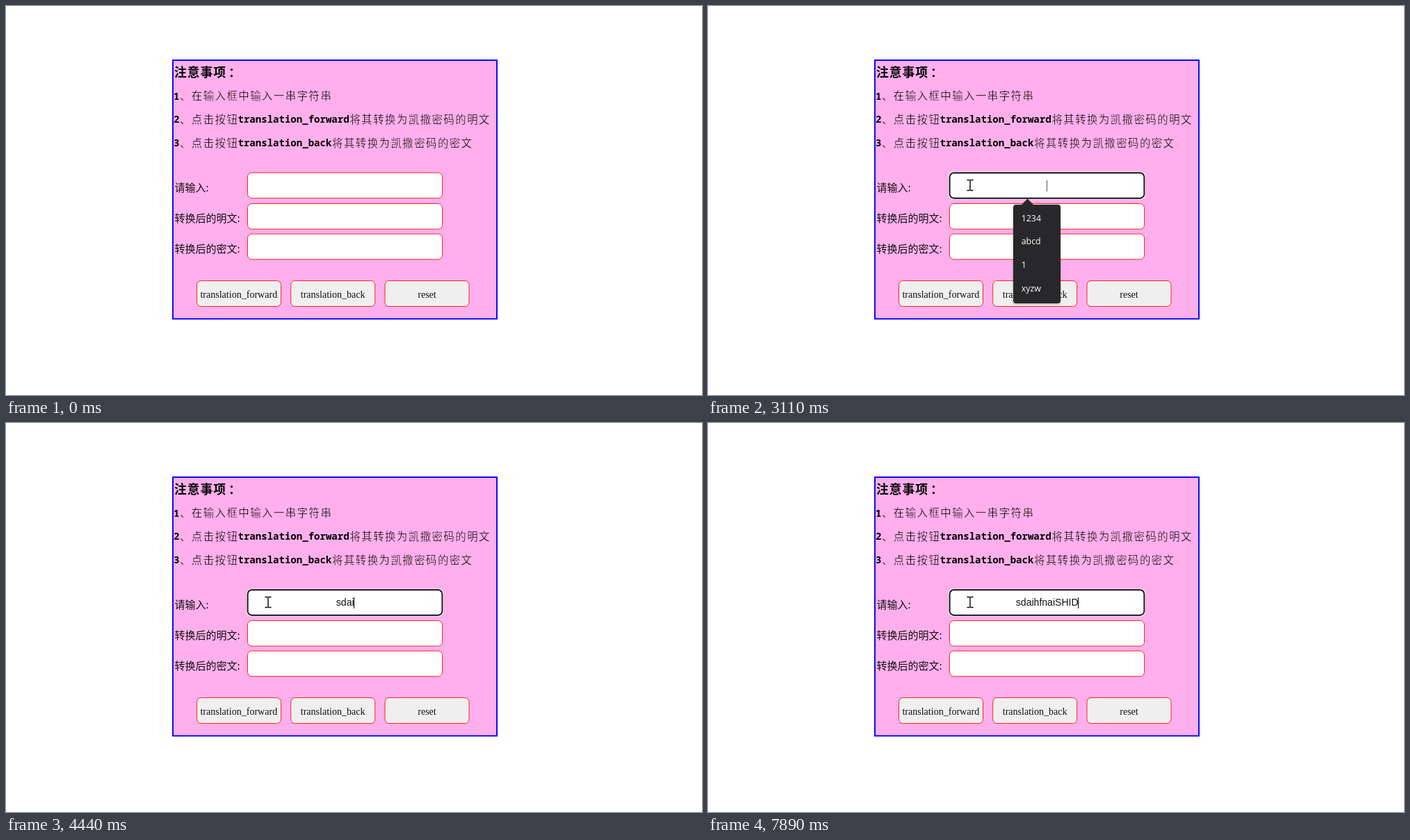
An HTML page that plays this animation: 1001x560 px, repeating every 8 s.

```html
<!DOCTYPE html>
<html lang="zh-CN">
<head>
<meta charset="utf-8">
<title>Cipher form</title>
<style>
  html, body { margin: 0; width: 100%; height: 100%; overflow: hidden; background: #fff; }
  svg { display: block; width: 100%; height: 100%; }
  text { fill: #000; white-space: pre; }
  .title { font: 700 17.8px "Noto Sans CJK SC", sans-serif; letter-spacing: .95px; }
  /* A thin stroke in the panel colour slims the brush-like lines */
  .note { font: 300 15.4px "Noto Sans CJK SC", sans-serif; letter-spacing: 1.475px; stroke: #ffb0ec; stroke-width: .35px; }
  .mono { font: 600 14.06px "Noto Sans Mono", monospace; letter-spacing: 0; stroke: none; }
  .label { font: 400 15px "Noto Sans CJK SC", sans-serif; }
  .label text { fill: #111; }
  .field { fill: #fff; stroke: #f22; }
  .button rect { fill: #efefef; stroke: #f22; }
  .button text { font: 14.06px "Liberation Serif", serif; text-anchor: middle; fill: #111; }
  #typed { font: 14.06px "Liberation Sans", sans-serif; text-anchor: middle; fill: #111; }
  #popup { transform-origin: 473px 357px; filter: drop-shadow(0 1px 1.5px rgba(0, 0, 0, .35)); }
  #popup path { fill: #28282b; }
  #popup text { font: 12.4px "Open Sans", sans-serif; fill: #fff; }
</style>
</head>
<body>
<svg viewBox="0 0 1001 560">
  <rect x="240" y="78" width="466" height="372.4" fill="#ffb0ec" stroke="#00f" stroke-width="1.9"/>

  <text class="title" x="242" y="102.3">注意事项<tspan dx="3">：</tspan></text>
  <g class="note">
    <text class="mono" x="241" y="134.5">1</text>
    <text x="250" y="134.8">、在输入框中输入一串字符串</text>
    <text class="mono" x="241" y="168.3">2</text>
    <text x="250" y="168.8">、点击按钮</text>
    <text class="mono" x="333.5" y="168.3">translation_forward</text>
    <text x="494.5" y="168.8">将其转换为凯撒密码的明文</text>
    <text class="mono" x="241" y="202">3</text>
    <text x="250" y="202.5">、点击按钮</text>
    <text class="mono" x="333.5" y="202">translation_back</text>
    <text x="469.1" y="202.5">将其转换为凯撒密码的密文</text>
  </g>

  <g class="label">
    <text x="242.5" y="266.7">请输入:</text>
    <text x="242.5" y="311">转换后的明文:</text>
    <text x="242.5" y="354.8">转换后的密文:</text>
  </g>

  <rect class="field" x="347.5" y="240" width="280" height="36.7" rx="6"/>
  <rect class="field" x="347.5" y="284.5" width="280" height="36.7" rx="6"/>
  <rect class="field" x="347.5" y="328.1" width="280" height="36.7" rx="6"/>

  <g class="button">
    <rect x="274.5" y="395.5" width="121" height="37" rx="6"/>
    <text x="334.8" y="419.5">translation_forward</text>
    <rect x="409.7" y="395.5" width="121" height="37" rx="6"/>
    <text x="470.2" y="419.5">translation_back</text>
    <rect x="545" y="395.5" width="121" height="37" rx="6"/>
    <text x="605.5" y="419.5">reset</text>
  </g>

  <g id="focus">
    <rect x="346" y="238.5" width="283" height="40" rx="7" fill="#fff"/>
    <rect x="347.6" y="240.2" width="279.8" height="36.5" rx="6" fill="#fff" stroke="#101010" stroke-width="1.9"/>
  </g>
  <text id="typed" x="487.7" y="262.6"></text>
  <rect id="caret" y="251" width="1" height="16"/>

  <g id="popup">
    <path d="M443 286H451L459.5 277.5 468 286H503Q507 286 507 290V424Q507 428 503 428H443Q439 428 439 424V290Q439 286 443 286Z"/>
    <text x="450.7" y="309.5">1234</text>
    <text x="450.7" y="343.3">abcd</text>
    <text x="450.7" y="377.1">1</text>
    <text x="450.7" y="410.9">xyzw</text>
  </g>

  <g id="mouse">
    <path id="arrow" d="M0 0V14.5L3.4 11.4 5.6 16.6 8 15.6 5.8 10.6H10.4Z" fill="#fff" stroke="#000" stroke-width=".9"/>
    <path id="beam" d="M-4.5-7.5H-1.5L0-6.7 1.5-7.5H4.5M0-6.7V6.7M-4.5 7.5H-1.5L0 6.7 1.5 7.5H4.5" fill="none" stroke="#000" stroke-width="1.4"/>
  </g>
  <circle id="press" cx="379" cy="255.5" r="11" fill="#ff0" opacity=".55"/>
</svg>
<script>
  const LOOP = 8000;
  const $ = id => document.getElementById(id);
  const show = (id, on) => $(id).setAttribute("visibility", on ? "visible" : "hidden");
  const within = (t, a, b) => t >= a && t < b;

  const easeOut = f => 1 - (1 - f) ** 1.5;
  const easeBoth = f => (1 - Math.cos(Math.PI * f)) / 2;

  // Pointer moves, each drawn in a few discrete steps
  const moves = [
    { start: 390, end: 810, steps: 7, from: [1050, 639], to: [359, 189], ease: easeOut },
    { start: 1030, end: 1370, steps: 5, from: [359, 189], to: [362, 157], ease: easeBoth, bow: -6 },
    { start: 1510, end: 1790, steps: 5, from: [362, 157], to: [381, 256], ease: easeBoth },
    { start: 3040, end: 3110, steps: 2, from: [381, 256], to: [377, 258], ease: f => f }
  ];

  // Time of each keystroke and the length of the text after it
  const word = "sdaihfnaiSHID";
  const keys = [[4170, 1], [4240, 2], [4370, 3], [4440, 4], [4770, 5], [4900, 6], [5100, 8],
                [5560, 9], [7100, 10], [7360, 11], [7430, 12], [7890, 13]];
  const blinks = [[2580, 3110], [3710, 4170], [6110, 6640]];

  function pointer(t) {
    const m = moves.filter(m => t >= m.start).pop();
    if (!m) return null;
    const gap = (m.end - m.start) / (m.steps - 1);
    const step = Math.min(m.steps, Math.floor((t - m.start) / gap + 1e-6) + 1);
    const f = m.ease(step / m.steps);
    const [x, y] = m.from.map((v, i) => v + (m.to[i] - v) * f);
    return [x + (m.bow || 0) * Math.sin(Math.PI * f), y];
  }

  function draw(t) {
    const pos = pointer(t);
    show("arrow", pos && t < 810);
    show("beam", t >= 810);
    if (pos) $("mouse").setAttribute("transform", `translate(${pos})`);
    show("press", within(t, 2050, 2180));
    show("focus", t >= 2120);

    const key = keys.filter(k => t >= k[0]).pop();
    const text = word.slice(0, key ? key[1] : 0);
    const typed = $("typed");
    if (typed.textContent !== text) typed.textContent = text;
    const width = text ? typed.getComputedTextLength() : 0;
    $("caret").setAttribute("x", Math.floor(487.7 + width / 2));
    $("caret").setAttribute("fill", text ? "#000" : "#555");
    show("caret", t >= 2120 && !blinks.some(b => within(t, ...b)));

    const fade = t < 4240 ? 1 : t < 4310 ? .75 : .41;
    show("popup", within(t, 2180, 4370));
    $("popup").style.opacity = fade;
    $("popup").style.transform = `scale(${1 - (1 - fade) * .06})`;
  }

  let begin;
  function tick(now) {
    begin ??= now;
    draw((now - begin) % LOOP);
    requestAnimationFrame(tick);
  }
  draw(0);
  requestAnimationFrame(tick);
</script>
</body>
</html>
```
